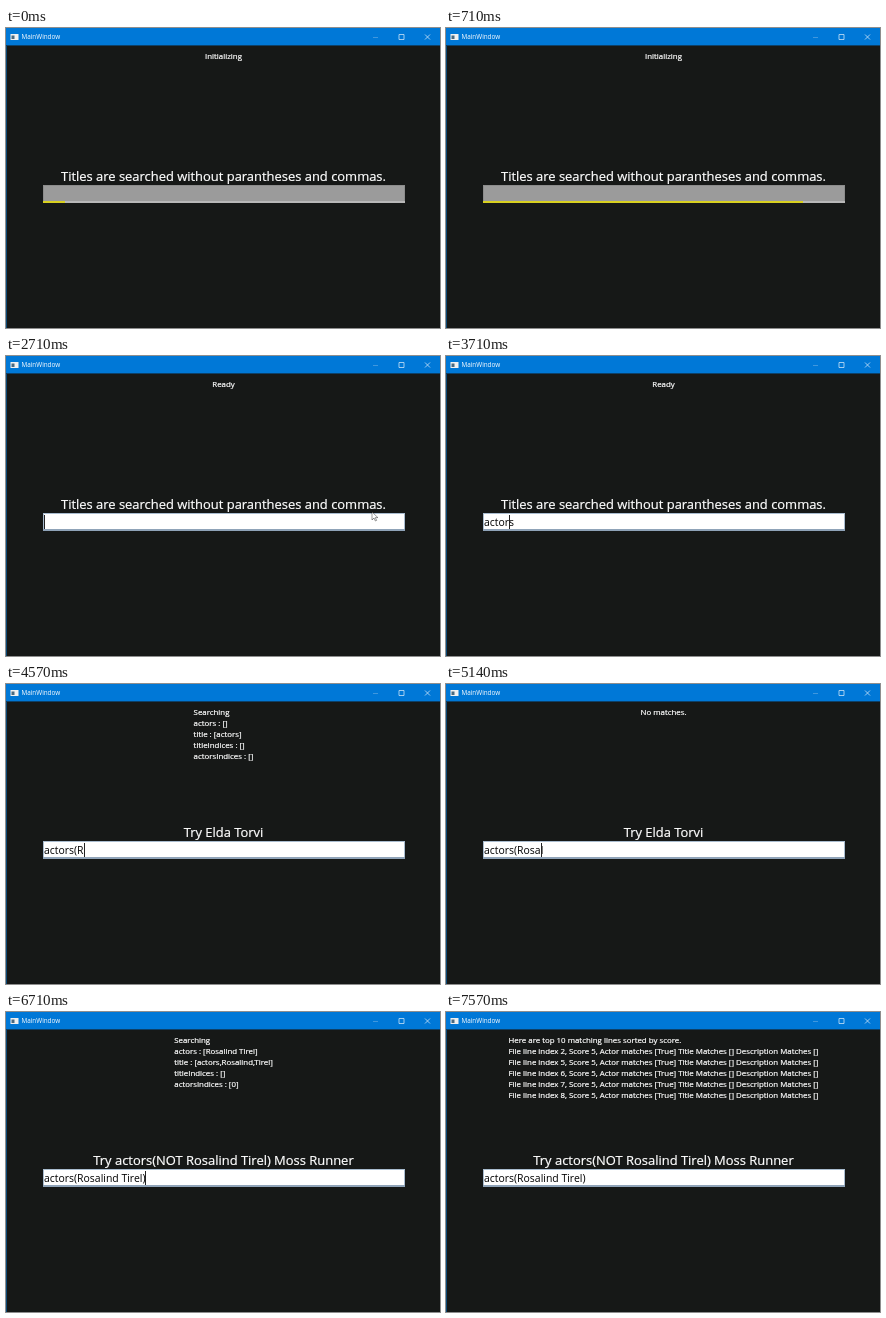
An HTML page for the animation above (8 s loop, 434 by 300 pixels).

```html
<!DOCTYPE html>
<html lang="en">
<head>
<meta charset="utf-8">
<title>MainWindow</title>
<style>
  html, body { margin: 0; width: 434px; height: 300px; overflow: hidden; background: #161817; }
  body { position: relative; font-family: "Open Sans", "Noto Sans", sans-serif; color: #fff; }
  body > * { position: absolute; white-space: pre; box-sizing: border-box; }
  #edge { left: 0; top: 17px; width: 1px; height: 283px; background: #0c4a78; }
  #bar { left: 0; top: 0; width: 434px; height: 18px; background: #0078d7; border-bottom: 1px solid #0d4068; }
  #name { left: 15.5px; top: 3px; font-size: 6.35px; line-height: 12px; }
  svg { left: 0; top: 0; }
  #status, #tip { -webkit-text-stroke: .22px #fff; }
  #status { left: 217.5px; top: 23px; transform: translateX(-50%); font-size: 7.88px; line-height: 11px; }
  #tip { left: 0; top: 139px; width: 435px; text-align: center; font-size: 12.95px; line-height: 18px; }
  #box { left: 37px; top: 157px; width: 362px; height: 17px; border: 1px solid; }
  #track { left: 37px; top: 173px; width: 362px; height: 2px; }
  #fill { height: 2px; background: #d8d020; }
  .typed { left: 38px; top: 158.5px; height: 14px; font-size: 10.45px; line-height: 15px; }
  #text { color: #000; }
  #caret { color: transparent; border-right: 1px solid #222; }
</style>
</head>
<body>
<div id="edge"></div>
<div id="bar"></div>
<div id="name">MainWindow</div>
<div id="status"></div>
<div id="tip"></div>
<div id="box"></div>
<div id="track"><div id="fill"></div></div>
<div id="text" class="typed"></div>
<div id="caret" class="typed"></div>
<svg width="434" height="300" fill="none">
  <rect x="4.5" y="6" width="8" height="6" fill="#f0f0f0"/>
  <rect x="5.5" y="7.5" width="3" height="3.5" fill="#4a6a80"/>
  <path d="M367 9.5h5" stroke="#3f97de"/>
  <path d="M393 6.5h5v5h-5zM419 6.5l5 5m0-5l-5 5" stroke="#d4e8f8" stroke-width=".75"/>
  <path id="beam" d="M-1.5-4h3M0-4v8M-1.5 4h3" stroke="#777" stroke-width=".8"/>
  <path id="arrow" d="M0 0v8l2-2 1.4 3 1.2-.6-1.3-2.8h2.6z" fill="#fff" stroke="#000" stroke-width=".4"/>
</svg>
<script>
const LOOP = 8000, TICK = 1000 / 7;   // the screen refreshes seven times a second
const $ = id => document.getElementById(id);

const search = (actors, title, indices) =>
  `Searching\nactors : [${actors}]\ntitle : [${title}]\ntitleIndices : []\nactorsIndices : [${indices}]`;
const results = ["Here are top 10 matching lines sorted by score.",
  ...[2, 5, 6, 7, 8].map(n =>
    `File line index ${n}, Score 5, Actor matches [True] Title Matches [] Description Matches []`)
].join("\n");

// [tick, value] lists
const statuses = [[0, "Initializing"], [6, "Ready"], [30, search("", "actors", "")],
  [33, "No matches."], [46, search("Rosalind Tirel", "actors,Rosalind,Tirel", "0")], [49, results]];
const tips = [[0, "Titles are searched without parantheses and commas."],
  [29, "Try Elda Torvi"], [39, "Try actors(NOT Rosalind Tirel) Moss Runner"]];
const query = "actors(Rosalind Tirel)";
const keys = [21, 22, 23, 24, 25, 26, 29, 31, 33, 34, 35, 36, 38, 39, 39, 40, 42, 43, 43, 44, 45, 46];
const mouse = [[9, 318, 30], [11, 303, 190], [13, 295, 167], [16, 300, 165], [20, 388, 153]];
const READY = 6, FOCUS = 16, BACK = 49;

const at = (list, k) => list.filter(e => e[0] <= k).pop()[1];
const typed = k => query.slice(0, keys.filter(t => t <= k).length);
const put = (id, s) => { if ($(id).textContent !== s) $(id).textContent = s; };
const show = (id, on) => $(id).style.display = on ? "" : "none";

function pointer(k) {
  const i = mouse.findIndex(p => p[0] >= k);
  if (k < mouse[0][0] || i < 0) return null;
  const b = mouse[i], a = mouse[Math.max(i - 1, 0)];
  const f = i ? (k - a[0]) / (b[0] - a[0]) : 0;
  return [a[1] + (b[1] - a[1]) * f, a[2] + (b[2] - a[2]) * f];
}

function draw(k) {
  put("status", at(statuses, k));
  put("tip", at(tips, k));
  put("text", typed(k));

  const ready = k >= READY, focus = k >= FOCUS;
  $("box").style.background = ready ? "#fff" : "#9b9b9b";
  $("box").style.borderColor = focus ? "#a9bccf" : ready ? "#c4c4c4" : "#8c8c8c";
  $("track").style.background = focus ? "#8fa3b8" : "#b8b8b8";
  $("fill").style.width = ready ? "0" : `${6 + k * 16.5}%`;

  // the caret trails the text by one tick and blinks after the last key
  put("caret", k >= BACK ? query.slice(0, -1) : typed(k - 1));
  const last = Math.max(FOCUS, ...[...keys, BACK].filter(t => t <= k));
  show("caret", focus && (k - last) % 8 < 4);

  const p = pointer(k), inside = p && p[1] > 157 && p[1] < 174;
  show("beam", inside);
  show("arrow", p && !inside);
  if (p) for (const id of ["beam", "arrow"]) $(id).setAttribute("transform", `translate(${p})`);
}

const start = performance.now();
function loop() {
  const t = (performance.now() - start) % LOOP;
  draw(Math.min(55, Math.floor((t + 5) / TICK)));
  requestAnimationFrame(loop);
}
loop();
</script>
</body>
</html>
```
